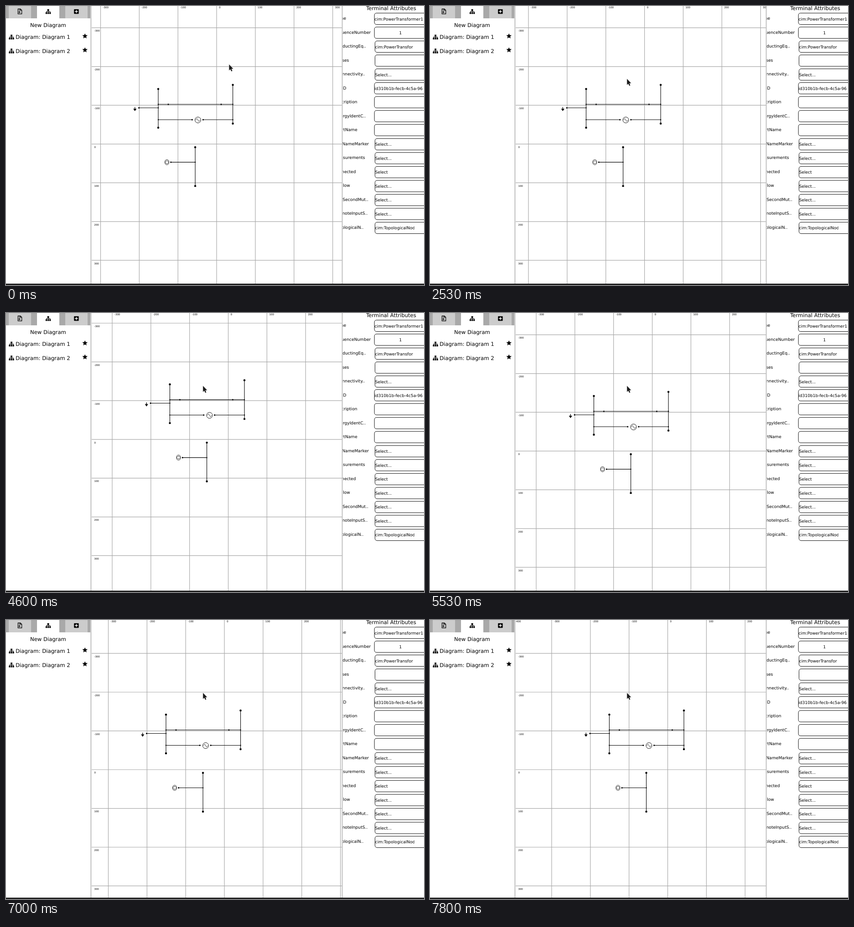
Animation of 917x611 px, one loop 8 s. Source, as an HTML page with a canvas:

```html
<!DOCTYPE html>
<html lang="en">
<head>
<meta charset="utf-8">
<title>Diagram editor</title>
<style>
html, body { margin: 0; width: 100%; height: 100%; overflow: hidden; background: #fff; }
canvas { display: block; width: 917px; height: 611px; }
</style>
</head>
<body>
<canvas id="stage"></canvas>
<script>
const W = 917, H = 611, LOOP = 8000;
const STEP = 8.487, CELL = STEP * 10;
const FONT = '"DejaVu Sans", sans-serif';
const canvas = document.getElementById('stage');
const ratio = window.devicePixelRatio || 1;
canvas.width = W * ratio;
canvas.height = H * ratio;
const ctx = canvas.getContext('2d');
ctx.scale(ratio, ratio);
ctx.textRendering = 'geometricPrecision';

// Times at which the view moves one step along each direction
const pans = [
  { dx: 1, dy: 0, at: [2530, 3000, 3400] },
  { dx: 0, dy: -1, at: [4070, 4330, 4600] },
  { dx: 0, dy: 1, at: [5130, 5330, 5530, 5730, 5870, 6070] },
  { dx: -1, dy: 0, at: [6470, 6670] },
  { dx: 1, dy: 0, at: [7000, 7130, 7330, 7530, 7670, 7800] }
];

// Pointer strokes, each split into equal steps
const strokes = [
  { start: 70, end: 200, steps: 3, from: [489.5, 128.3], to: [464, 137] },
  { start: 400, end: 870, steps: 8, from: [464, 137], to: [432.3, 160] }
];

// Label, right edge of the label, field text, kind of field
const rows = [
  ['name', 746, 'cim:PowerTransformer1', 'input'],
  ['sequenceNumber', 800.3, '1', 'number'],
  ['ConductingEq..', 789.8, 'cim:PowerTransfor', 'select'],
  ['phases', 752.3, '', 'select'],
  ['Connectivity..', 787.3, 'Select...', 'select'],
  ['mRID', 746.5, 'id310b1b-fecb-4c5a-96', 'input'],
  ['description', 770.5, '', 'input'],
  ['energyIdentC..', 789.3, '', 'input'],
  ['shortName', 770.8, '', 'input'],
  ['NameMarker', 796, 'Select...', 'select'],
  ['Measurements', 787.5, 'Select...', 'select'],
  ['connected', 767.5, 'Select', 'select'],
  ['Flow', 754.8, 'Select...', 'select'],
  ['SecondMut..', 795, 'Select...', 'select'],
  ['RemoteInputS..', 793.3, 'Select...', 'select'],
  ['TopologicalN..', 784.3, 'cim:TopologicalNode', 'select']
];

function rect(x, y, w, h, color) {
  ctx.fillStyle = color;
  ctx.fillRect(x, y, w, h);
}

function line(x1, y1, x2, y2, color = '#000', width = 1.1) {
  ctx.strokeStyle = color;
  ctx.lineWidth = width;
  ctx.beginPath();
  ctx.moveTo(x1, y1);
  ctx.lineTo(x2, y2);
  ctx.stroke();
}

function dot(x, y, r) {
  ctx.fillStyle = '#000';
  ctx.beginPath();
  ctx.arc(x, y, r, 0, Math.PI * 2);
  ctx.fill();
}

function ring(x, y, r, width) {
  ctx.strokeStyle = '#000';
  ctx.lineWidth = width;
  ctx.beginPath();
  ctx.arc(x, y, r, 0, Math.PI * 2);
  ctx.stroke();
}

function polygon(points) {
  ctx.beginPath();
  points.forEach(([x, y]) => ctx.lineTo(x, y));
  ctx.closePath();
}

function text(str, x, y, size, align = 'left') {
  ctx.fillStyle = '#000';
  ctx.font = size + 'px ' + FONT;
  ctx.textAlign = align;
  ctx.fillText(str, x, y);
}

function clipped(x, y, w, h, draw) {
  ctx.save();
  ctx.beginPath();
  ctx.rect(x, y, w, h);
  ctx.clip();
  draw();
  ctx.restore();
}

function viewAt(t) {
  let x = 0, y = 0;
  for (const { dx, dy, at } of pans) {
    const n = at.filter(s => t >= s).length;
    x += dx * n * STEP;
    y += dy * n * STEP;
  }
  return [x, y];
}

function pointerAt(t) {
  let pos = strokes[0].from;
  for (const { start, end, steps, from, to } of strokes) {
    if (t < start) break;
    const gap = (end - start) / (steps - 1);
    const k = Math.min(steps, Math.floor((t - start) / gap + 0.08) + 1) / steps;
    pos = from.map((v, i) => v + (to[i] - v) * k);
  }
  return pos;
}

function sitemap(x, y) {
  rect(x - 1.9, y - 5.2, 3.8, 3.7, '#000');
  for (const dx of [-4.1, 0, 4.1]) {
    rect(x + dx - 1.6, y + 1.7, 3.2, 3.5, '#000');
    line(x + dx, y - 0.1, x + dx, y + 2);
  }
  line(x - 4.6, y, x + 4.6, y);
  line(x, y - 2, x, y + 2);
}

function star(x, y) {
  const points = Array.from({ length: 10 }, (_, i) => {
    const r = i % 2 ? 2.8 : 6.1, a = i * Math.PI / 5;
    return [x + r * Math.sin(a), y - r * Math.cos(a)];
  });
  ctx.fillStyle = '#000';
  polygon(points);
  ctx.fill();
}

function archiveIcon() {
  ctx.strokeStyle = '#000';
  ctx.lineWidth = 1.2;
  polygon([[26.3, 6.3], [31.7, 6.3], [34.6, 9.2], [34.6, 17.4], [26.3, 17.4]]);
  ctx.stroke();
  ctx.beginPath();
  ctx.moveTo(31.4, 6.3);
  ctx.lineTo(31.4, 9.5);
  ctx.lineTo(34.6, 9.5);
  ctx.stroke();
  for (let i = 0; i < 4; i++) rect(28.4 + i % 2 * 1.1, 7 + i * 1.2, 1.1, 1.1, '#000');
  ring(29.5, 13.6, 1.3, 1.1);
}

function sidebar() {
  rect(0, 0, 185, 27, '#a9a9a9');
  rect(6, 0, 49, 27, '#cccccc');
  rect(68, 0, 49, 27, '#ffffff');
  rect(130, 0, 49, 27, '#cccccc');
  archiveIcon();
  sitemap(92.6, 12.2);
  ctx.fillStyle = '#000';
  ctx.beginPath();
  ctx.roundRect(149.2, 6.9, 10.4, 10.4, 1.4);
  ctx.fill();
  line(151.2, 12.1, 157.6, 12.1, '#fff', 1.5);
  line(154.4, 8.9, 154.4, 15.3, '#fff', 1.5);

  text('New Diagram', 92.4, 46, 11.6, 'center');
  for (const n of [1, 2]) {
    const y = 68 + (n - 1) * 30.5;
    sitemap(12, y);
    text('Diagram: Diagram ' + n, 21, y + 4.2, 11.75);
    star(173.2, y - 2);
  }
}

function field(i, value, kind) {
  const select = kind === 'select';
  const left = select ? 809.5 : 808.2;
  const mid = 28 + i * 30.53 - (i > 4 && !select ? 0.5 : 0);
  ctx.strokeStyle = '#111';
  ctx.lineWidth = 1;
  ctx.beginPath();
  ctx.roundRect(left, mid - 12.5, 125, 25, 4.5);
  ctx.stroke();
  const base = mid + 3.5;
  if (kind === 'number') text(value, 865.5, base, 9.05, 'center');
  else clipped(left - 1, mid - 12, select ? 87.5 : 120, 24,
    () => text(value, left + 0.2, base, 9.05));
}

function attributes() {
  text('Terminal Attributes', 845, 9.4, 11.55, 'center');
  clipped(738.6, 0, 75, H, () =>
    rows.forEach(([label, right], i) => text(label, right, 30 + i * 30.53, 9.15, 'right')));
  rows.forEach(([, , value, kind], i) => field(i, value, kind));
}

function grid(vx, vy) {
  for (let n = -4; n <= 4; n++) {
    const x = 462.1 + n * CELL + vx, y = 302.3 + n * CELL + vy;
    line(x, 0, x, 608, '#a9a9a9', 1.2);
    line(188, y, 737, y, '#a9a9a9', 1.2);
  }
  for (let n = -4; n <= 4; n++) {
    text(n * 100, 467.2 + n * CELL + vx, 5.1, 5.4);
    text(n * 100, 193.5, 311 + n * CELL + vy, 5.4);
  }
}

function busbar(x, y) {
  line(x, y, x, y + CELL);
  dot(x, y, 2.2);
  dot(x, y + CELL, 2.2);
}

function wire(x1, x2, y, ...ends) {
  line(x1, y, x2, y);
  dot(x1, y, 1.2);
  dot(x2, y, 1.2);
  ends.forEach(x => dot(x, y, 1.5));
}

function network() {
  busbar(334, 181.7);
  busbar(497.6, 172.7);
  busbar(415.1, 309.3);
  wire(334, 497.6, 215.3, 356, 472);
  wire(334, 408.3, 249, 408.3);
  wire(432.3, 497.6, 249, 432.3);
  wire(291.6, 334, 223, 291.6);
  wire(361.7, 415.1, 342.1, 361.7);

  // load
  line(282.8, 221.2, 282.8, 226, '#000', 1.3);
  ctx.fillStyle = '#000';
  polygon([[279.2, 225], [286.4, 225], [282.8, 230.3]]);
  ctx.fill();

  // generator
  ring(421, 249.6, 6.5, 0.9);
  ctx.beginPath();
  for (let x = -4.6; x <= 4.61; x += 0.4)
    ctx.lineTo(421 + x, 249.6 - 2.9 * Math.sin((x + 4.6) / 9.2 * Math.PI * 2));
  ctx.stroke();

  // transformer
  ring(353, 340.8, 4.4, 0.8);
  ring(353, 343.4, 4.4, 0.8);
}

function pointer([x, y]) {
  ctx.save();
  ctx.translate(x, y);
  polygon([[0, 0], [0, 12.4], [2.8, 9.9], [4.9, 14.6], [6.9, 13.7], [4.9, 9.2], [8.6, 9]]);
  ctx.lineJoin = 'round';
  ctx.lineWidth = 1.2;
  ctx.strokeStyle = '#c4c4c4';
  ctx.stroke();
  ctx.fillStyle = '#1a1a1a';
  ctx.fill();
  ctx.restore();
}

function render(t) {
  const [vx, vy] = viewAt(t);
  rect(0, 0, W, H, '#fff');
  clipped(188, 0, 549, 608, () => {
    grid(vx, vy);
    ctx.translate(vx, vy);
    network();
  });
  sidebar();
  attributes();
  rect(185.2, 0, 2.4, 608, '#c8c8c8');
  rect(736.6, 0, 2, 608, '#c0c0c0');
  rect(0, 608, W, 3, '#242424');
  pointer(pointerAt(t));
}

const began = performance.now();
function tick() {
  render((performance.now() - began) % LOOP);
  requestAnimationFrame(tick);
}
tick();
</script>
</body>
</html>
```
